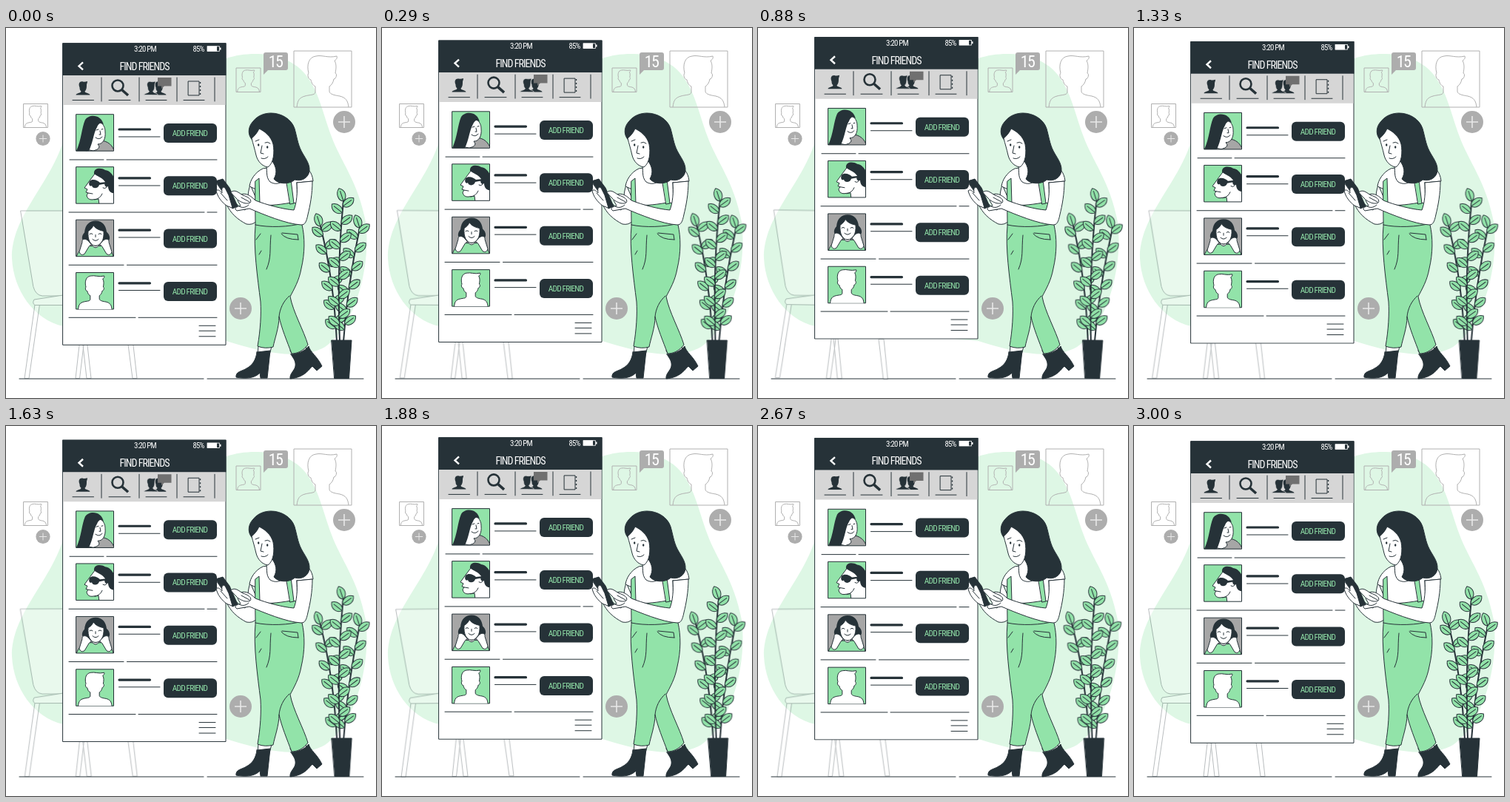
An HTML page that plays this animation: 500 px wide and 500 px high, repeating every 3.04 s.

```html
<!DOCTYPE html>
<html lang="en">
<head>
<meta charset="utf-8">
<title>Find friends</title>
<style>
html, body { margin: 0; width: 100%; height: 100%; overflow: hidden; background: #fff; }
svg { display: block; width: 100vw; height: 100vh; }
.o { stroke: #263238; stroke-width: 1; stroke-linecap: round; stroke-linejoin: round; }
.n { fill: none; }
.w { fill: #fff; }
.g { fill: #92e3a9; }
.d { fill: #263238; }
.m { fill: #a6a6a6; }
.soft { fill: #adadad; }
.grey { fill: none; stroke: #b0b0b0; stroke-width: 1; stroke-linejoin: round; }
.thick { stroke-width: 3.2; }
text { font-family: "Roboto Condensed", "Open Sans", "Noto Sans", sans-serif; font-stretch: 62.5%; letter-spacing: -.07em; text-anchor: middle; }
#phone { animation: float 3040ms linear infinite; }
#plant, #chair { animation: sway 3040ms linear infinite; }
#plant { transform-origin: 453px 345px; }
#chair { transform-origin: 98px 360px; }
@keyframes float {
  0%, 49.34%, 98.68%, 100% { transform: translateY(0); }
  24.67%, 74.01% { transform: translateY(-10px); }
}
@keyframes sway {
  0%, 98.68%, 100% { transform: rotate(0deg); }
  24.67% { transform: rotate(1deg); }
  74.01% { transform: rotate(-1deg); }
}
</style>
</head>
<body>
<svg viewBox="0 0 500 500">
<defs>
  <path id="bust" vector-effect="non-scaling-stroke" d="M4 76C5 66 8 63 15 61C22 59 28 60 29 56V48C25 46 24 43 23 39C19 38 18 32 20 30C17 19 20 8 30 7C38 5 46 10 58 7C59 10 57 12 55 13C58 19 57 24 56 30C59 31 57 38 54 38C53 43 51 46 48 48V55C49 59 56 60 62 61C70 63 73 67 74 76"/>
  <g id="plus"><circle class="soft" r="15"/><path d="M-8 0H8M0 -8V8" stroke="#e8e8e8" stroke-width="1.6"/></g>
  <path id="user" class="d" d="M-9.500 9C-9 6 -3 7 -2.500 4C-4 3 -4.500 1 -4.500 -1C-7 -7 -4 -10 0 -9C2 -8.500 4 -9 6 -9.500C6 -7 5 -6 5 -5C5 -2 5 2 2.500 4C3 7 9 6 9.500 9Z"/>
  <g id="leaf"><path class="o g" d="M0 0C2 -7 12 -9 18 -3C15 5 5 7 0 0Z"/><path class="o n" stroke-width=".6" d="M0 0L14 -2"/></g>
  <g id="row">
    <rect class="d" x="213" y="129" width="72" height="26" rx="6"/>
    <text x="248.500" y="146" font-size="11.300" fill="#92e3a9">ADD FRIEND</text>
  </g>
  <rect id="frame" x="95" y="116.700" width="50.500" height="49.500"/>
  <clipPath id="crop"><use href="#frame"/></clipPath>
</defs>

<path fill="#def7e5" d="M298 41C332 30 380 33 404 62C423 85 428 115 440 147C452 180 476 208 486 262C494 325 470 405 431 431C397 450 345 438 298 423L77 403C38 394 10 355 8 311C7 256 58 213 77 154L150 90Z"/>

<g class="grey">
  <rect x="23.500" y="102.500" width="33" height="32"/>
  <use href="#bust" transform="translate(23.500 102.500) scale(.42)"/>
  <rect x="311" y="54" width="33" height="32.500"/>
  <use href="#bust" transform="translate(311 54) scale(.425)"/>
  <rect x="389" y="31" width="78" height="76"/>
  <use href="#bust" transform="translate(389 31)"/>
</g>
<use href="#plus" transform="translate(50 149.500) scale(.64)"/>
<use href="#plus" x="457" y="127"/>
<use href="#plus" x="317" y="379"/>
<path class="soft" d="M351 33H378Q381 33 381 36V54Q381 57 378 57H354L348 63V36Q348 33 351 33Z"/>
<text x="364" y="53" font-size="22" fill="#fff">15</text>

<path class="o" d="M18 474H267M272 474H483"/>

<g id="chair" class="o w" opacity=".32">
  <path d="M39 374L25 473.500H31L46 370ZM100 420L94 473.500H99.500L106 420ZM103 420L109 473.500H115L109 420ZM164 420L171 473.500H177L171 420Z"/>
  <path d="M20 247H150L160 362H49Q40 361 37 350Z"/>
  <path d="M160 361H77L38 367Q35 372 39 374.500H160Z"/>
</g>

<g id="phone">
  <rect class="o w" x="77" y="20.800" width="220" height="407.500"/>
  <path fill="#d6d6d6" d="M77.500 64H296.500V104H77.500Z"/>
  <path class="d" d="M76.500 20.300H297.500V64H76.500Z"/>
  <g fill="#fff">
    <text x="188" y="32" font-size="10.800">3:20 PM</text>
    <text x="260" y="32" font-size="10.800">85%</text>
    <text x="187" y="56.800" font-size="14">FIND FRIENDS</text>
    <rect x="272" y="24.500" width="13" height="7"/>
    <path d="M289 26.500h1.500v3H289z"/>
  </g>
  <rect x="272" y="24.800" width="16.500" height="6.500" fill="none" stroke="#fff" stroke-width=".8"/>
  <path d="M104 46.500L98.500 51.500L104 56.500" fill="none" stroke="#fff" stroke-width="2.400"/>
  <path class="o n" d="M129 67V99M180 67V99M231 67V99M282 67V99M90 97.500H118.500M139 97.500H168M189 97.500H217M240 97.500H268"/>
  <use href="#user" x="104" y="81.500"/>
  <circle cx="151" cy="78" r="7.500" fill="none" stroke="#263238" stroke-width="2.600"/>
  <path d="M156.500 83.500L165 91" stroke="#263238" stroke-width="3.600"/>
  <use href="#user" x="207" y="81.500"/>
  <use href="#user" x="196" y="81.500" stroke="#d6d6d6" stroke-width=".7"/>
  <path fill="#707070" d="M205 67H223.500V78.500H214L210 82V78.500H205Z"/>
  <path class="o n" d="M246.500 72H261V91H246.500Z"/>
  <path d="M262.500 73V91" stroke="#263238" stroke-width="1.400" stroke-dasharray="2 3"/>

  <g class="o n">
    <path d="M86 178H132M136 178H285M85 249H268M272 249H285M85 320.300H159M163.500 320.300H285M85 391.300H175M179 391.300H285"/>
    <path d="M152.500 147H208M152.500 213H208M152.500 283H208M152.500 354.500H208M261 402.300H283M261 409.300H283M261 416.800H283"/>
    <path class="thick" d="M153 137H194.500M153 202.800H194.500M153 273.200H194.500M153 344.800H194.500"/>
  </g>
  <use href="#row"/><use href="#row" y="71.200"/><use href="#row" y="142.600"/><use href="#row" y="214"/>

  <g clip-path="url(#crop)">
    <use href="#frame" class="g"/>
    <path class="o m" d="M108 168C112 156 119 151 128 152C138 153 144 158 147 168Z"/>
    <path class="o w" d="M115 128C126 123 134 130 134 140C135 150 131 157 124 157Q130 163 118 166L108 164Z"/>
    <path class="d" d="M94 168C102 153 102 135 107 124C112 116 129 116 132 131C128 127 125 129 123 134C118 142 118 155 111 168Z"/>
    <path class="o n" d="M122 138l3-1M129 137l2-.5M127 139l1 5h-2M121 148q5 4 9-1"/>
  </g>
  <use href="#frame" class="o n"/>

  <g transform="translate(0 71)" clip-path="url(#crop)">
    <use href="#frame" class="g"/>
    <path class="o w" d="M120 126L114 134L106 145L110 147L108 151L111 152L109 155Q110 161 116 161L125 160L126 168H147V130Z"/>
    <path class="d" d="M119 126C118 118 128 117 134 121C142 122 146 130 147 136V152C141 153 138 148 138 143C134 145 132 141 134 137C129 130 125 131 119 126Z"/>
    <path class="d" d="M113 136C117 132 124 135 127 138L136 137V139L126 141C125 146 117 147 116 142C113 144 111 140 113 136Z"/>
    <path class="o n" d="M111 152L117 153M132 139q6-2 4 5q-2 3-5 1M120 161q7-1 10-8"/>
  </g>
  <use href="#frame" y="71" class="o n"/>

  <g transform="translate(0 142.500)" clip-path="url(#crop)">
    <use href="#frame" class="m"/>
    <path class="d" d="M108 143C101 148 102 137 106 134C107 123 113 118 121 118C131 118 135 125 136 133C141 137 142 145 136 147L130 150H112Z"/>
    <path class="o g" d="M95 168C97 157 106 153 114 152H129C138 153 144 158 145 168Z"/>
    <path class="o w" d="M111 132C115 130 117 127 118 124C121 129 127 131 132 132C133 145 128 151 121 152C114 151 110 144 111 132ZM116 151q5 7 10 0"/>
    <path class="o w" d="M111 145C107 141 102 143 103 147L99 160Q101 166 106 163L112 153L115 150ZM131 145C135 141 140 143 139 147L143 160Q141 166 136 163L130 153L127 150Z"/>
    <path class="o n" d="M113 136q2-2 4 0M125 136q2-2 4 0M117 143q4 4 8 0M121 137v3"/>
  </g>
  <use href="#frame" y="142.500" class="o n"/>

  <use href="#frame" y="213.800" class="o g"/>
  <use href="#bust" class="o w" transform="translate(95 330.500) scale(.65)"/>
</g>

<g id="woman" class="o">
  <path class="w" d="M341 430L340 442H356L359 430ZM384 436L390 447L407 436L403 426Z"/>
  <path class="d" d="M339 438L357 436L353 473H344L343 466C336 474 322 474 311 472C310 464 319 464 325 460C333 456 338 448 339 438Z"/>
  <path class="d" d="M385 441C392 441 404 437 409 430C411 438 421 444 427 457L420 463L414 457C408 463 403 472 384 474C383 467 390 463 391 457C392 450 388 446 385 441Z"/>
  <path class="w" d="M330 212C325 226 328 239 323 246L306 238L298 238C303 250 313 259 325 265C336 267 341 260 345 248Z"/>
  <path class="w" d="M347 190C336 195 330 206 329 214L338 218L337 240H394L393 209L415 207C414 195 407 186 395 184Z"/>
  <path class="g" d="M337 236C350 242 366 239 386 236L394 237C396 248 399 257 400 266C404 283 404 304 399 325C396 342 389 353 384 363C388 384 402 408 408 428C402 436 394 440 386 440C380 424 372 405 369 390C369 405 363 420 361 431Q350 434 340 430C344 407 345 386 344 370C340 338 334 296 337 268Z"/>
  <path class="g" d="M337 207L342 203L343 238L337 237ZM379 207L385 205L389 237L384 238Z"/>
  <path class="n" d="M337 266C355 270 383 269 400 264M372 278Q378 286 395 286M373 277L394 279L395 286M338 286L344 278M358 280C356 300 359 310 352 326M369 390C370 379 375 369 383 362M345 301L342 306"/>
  <path class="w" d="M351 180C354 192 350 201 357 208C367 214 378 208 382 194L372 175Z"/>
  <path class="w" d="M393 209L414 207C414 224 411 240 408 252C406 262 404 266 399 266C379 265 348 252 329 244L312 247C308 244 310 242 317 240L313 233L317 225C325 222 332 228 337 233C352 239 375 245 389 246C393 236 394 222 393 209Z"/>
  <path class="d" d="M331 149C326 142 328 132 334 126C340 118 350 115 358 115C372 115 386 123 390 136C393 146 394 156 399 166C403 174 411 183 410 193C409 202 400 208 390 205C386 210 370 213 362 204C367 195 365 188 360 180L340 160Z"/>
  <path class="w" d="M332 149C336 146 340 141 342 136C350 140 358 146 361 157C363 168 362 182 354 188C346 187 340 180 338 172C336 163 334 157 332 149Z"/>
  <path class="n" d="M337 153l5-2M350 155q4-2 7 1M346 159L344 169L348 170M345 176q5 2 9-2"/>
  <path class="d" stroke="none" d="M340 158a1.200 1.800 0 1 0 2.400 0a1.200 1.800 0 1 0-2.400 0M352 161a1.200 1.800 0 1 0 2.400 0a1.200 1.800 0 1 0-2.400 0"/>
  <path class="d" d="M283 207L293 204L302 216L313 241L306 244L296 226Z"/>
  <path class="w" d="M298 240C291 235 286 228 284 220C287 217 290 221 292 223C291 216 293 214 296 216L301 226L306 243ZM304 222C309 217 315 223 320 226C327 228 333 232 330 236C324 239 317 235 313 232Z"/>
  <path class="n" d="M290 223L299 233M311 237C316 244 323 244 328 239M318 229L329 235"/>
</g>

<g id="plant">
  <g id="stems"></g>
  <path class="o d" d="M440 422H467L463.500 473.500H444Z"/>
</g>
</svg>
<script>
const NS = "http://www.w3.org/2000/svg";
const stems = document.getElementById("stems");
const add = (tag, attrs) => {
  const el = document.createElementNS(NS, tag);
  for (const k in attrs) el.setAttribute(k, attrs[k]);
  stems.appendChild(el);
};
const leaf = (x, y, angle, flip = 1) =>
  add("use", { href: "#leaf", transform: `translate(${x} ${y}) scale(${flip} 1) rotate(${angle})` });

// Each stem: base, control point, tip, number of leaf pairs.
const shapes = [
  [447, 424, 443, 340, 425, 268, 6],
  [456, 424, 461, 350, 478, 270, 6],
  [451, 424, 447, 320, 456, 234, 7]
];
for (const [x0, y0, cx, cy, x1, y1, pairs] of shapes) {
  add("path", { d: `M${x0} ${y0}Q${cx} ${cy} ${x1} ${y1}`, fill: "none", stroke: "#263238", "stroke-width": 2 });
  const at = (a, b, c, t) => (1 - t) ** 2 * a + 2 * t * (1 - t) * b + t * t * c;
  for (let i = 0; i < pairs; i++) {
    const t = 0.16 + 0.8 * i / (pairs - 1), u = t - 0.05;
    leaf(at(x0, cx, x1, t), at(y0, cy, y1, t), -28);
    leaf(at(x0, cx, x1, u), at(y0, cy, y1, u), -30, -1);
  }
  leaf(x1, y1, -100);
}
</script>
</body>
</html>
```
